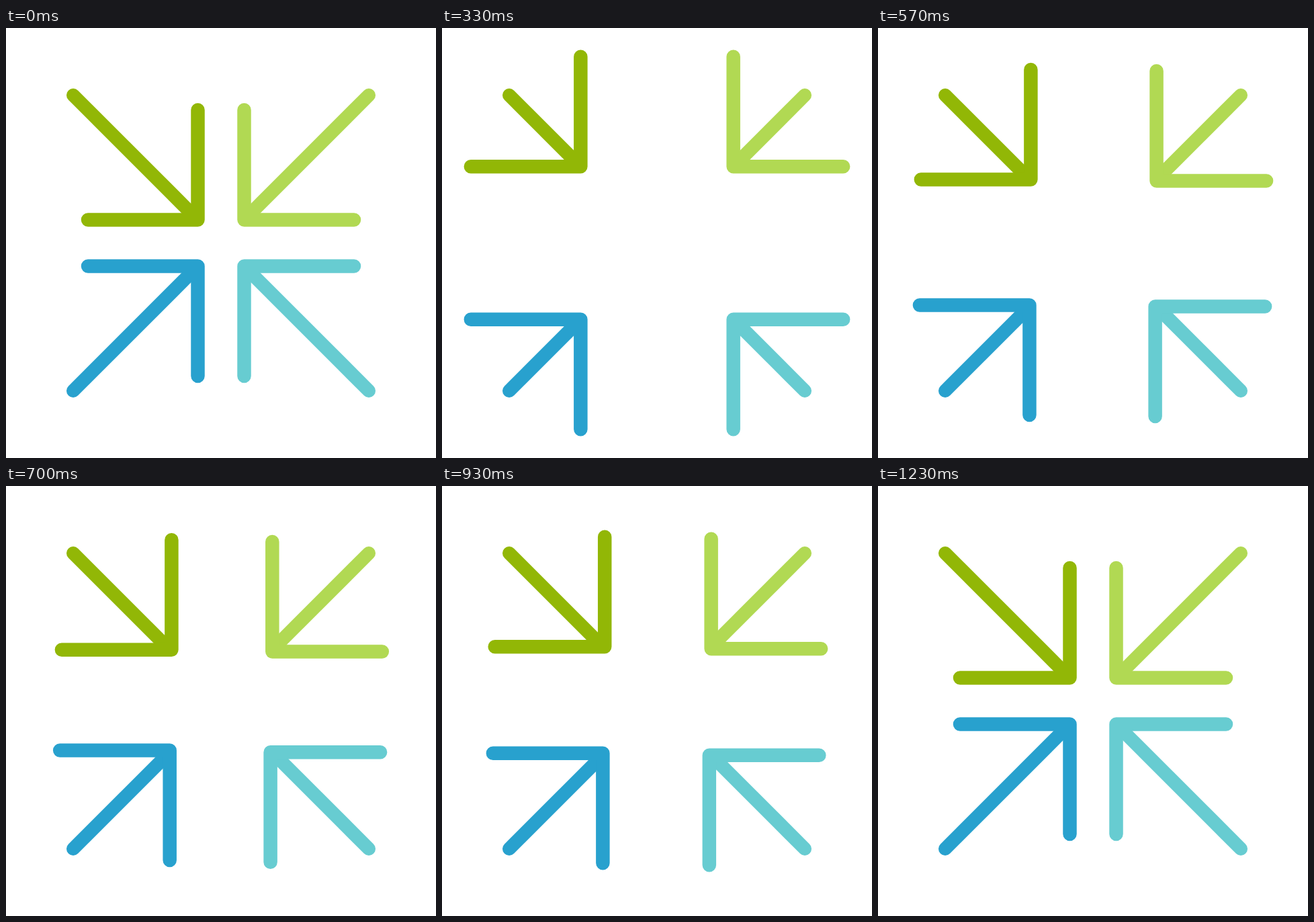
An HTML page that plays this animation: 640 px wide and 640 px high, repeating every 2000 ms.

```html
<!DOCTYPE html>
<html>
<head>
<meta charset="utf-8">
<style>
  html, body { margin: 0; height: 100%; overflow: hidden; background: #fff; }
  svg { display: block; width: 100%; height: 100%; }
  path { fill: none; stroke-linecap: round; stroke-linejoin: round; }
</style>
</head>
<body>
<svg id="stage" viewBox="-320 -320 640 640"></svg>
<script>
const LOOP = 2000, FPS = 30, ARM = 163.5, TAIL = 220;
const COLORS = ['#92b706', '#b1d953', '#67ccd1', '#28a1ce']; // clockwise from top left

// [frame, distance of the arrow tip from the centre]
const KEYS = [[0.6, 34.5], [12.6, 124.5], [13, 124.5], [20, 73.5], [25, 87.5], [37, 34.5]];

const stage = document.getElementById('stage');

function addPath(parent, width) {
  const path = document.createElementNS(stage.namespaceURI, 'path');
  path.setAttribute('stroke-width', width);
  return parent.appendChild(path);
}

const arrows = COLORS.map((color, i) => {
  const group = document.createElementNS(stage.namespaceURI, 'g');
  group.setAttribute('stroke', color);
  group.setAttribute('transform', `rotate(${i * 90})`);
  stage.appendChild(group);
  return { tail: addPath(group, 20), head: addPath(group, 20.5) };
});

function distanceAt(frame) {
  if (frame <= KEYS[0][0]) return KEYS[0][1];
  for (let i = 1; i < KEYS.length; i++) {
    const [f0, d0] = KEYS[i - 1], [f1, d1] = KEYS[i];
    if (frame <= f1) {
      const s = (frame - f0) / (f1 - f0);
      return d0 + (d1 - d0) * s * s * (3 - 2 * s);
    }
  }
  return KEYS[KEYS.length - 1][1];
}

// The heads bow slightly sideways on their way back.
function driftAt(frame) {
  if (frame <= 13 || frame >= 37) return 0;
  return 1.48 * Math.sin(Math.PI * (frame - 13) / 24) ** 0.6;
}

function draw(now) {
  const frame = Math.floor((now % LOOP) * FPS / 1000 + 0.12);
  const d = distanceAt(frame), drift = driftAt(frame);
  const x = drift - d, y = -drift - d, end = -d - 5;
  for (const { tail, head } of arrows) {
    tail.setAttribute('d', `M${-TAIL} ${-TAIL}L${end} ${end}`);
    head.setAttribute('d', `M${x - ARM} ${y}H${x}V${y - ARM}`);
  }
}

const start = performance.now();
function tick() {
  draw(performance.now() - start);
  requestAnimationFrame(tick);
}
tick();
</script>
</body>
</html>
```
